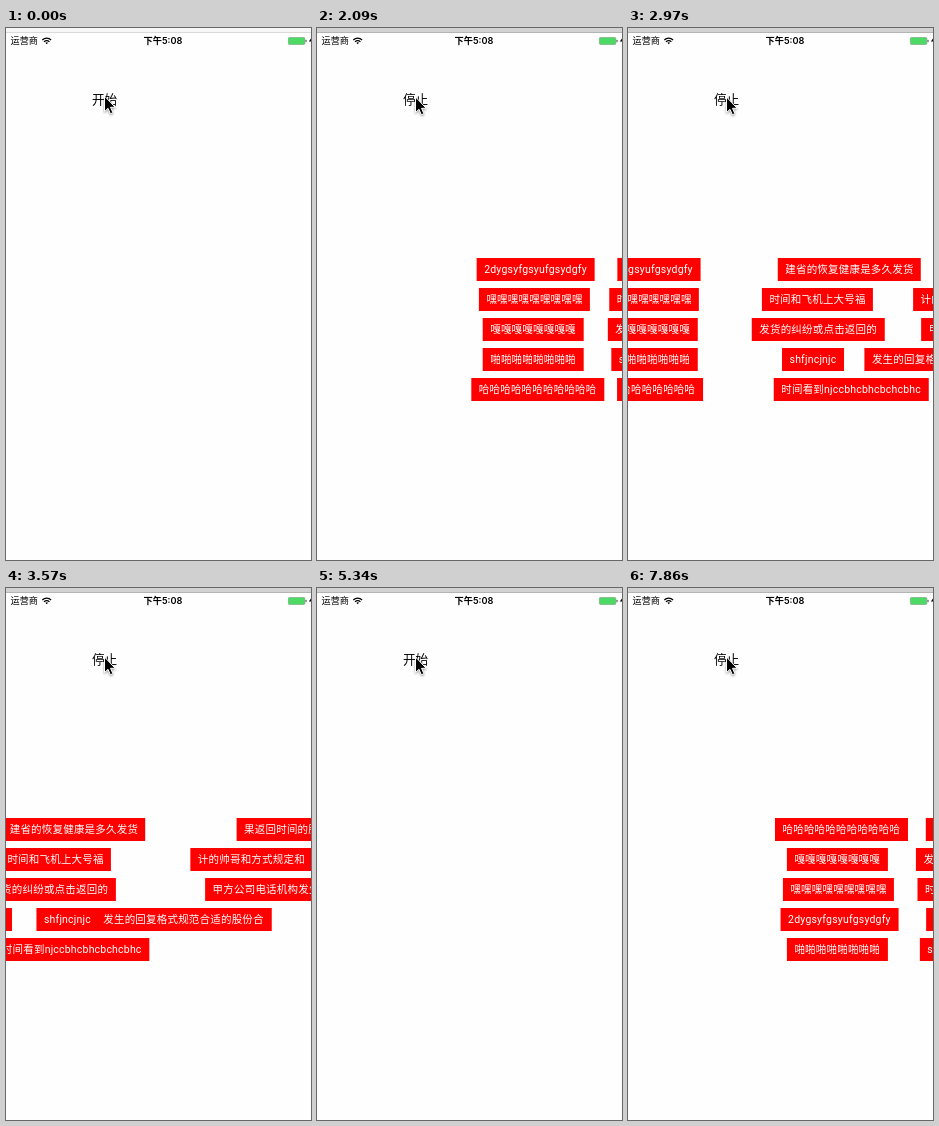
Animation, 305 px wide and 532 px high, one loop 8000 ms. Source, as an HTML page:

```html
<!DOCTYPE html>
<html lang="zh-CN">
<head>
<meta charset="utf-8">
<style>
  html, body { margin: 0; width: 100%; height: 100%; overflow: hidden; background: #fefefe; }
  #stage { position: relative; width: 305px; height: 532px; overflow: hidden; }
  svg { position: absolute; left: 0; top: 0; }
  text { font-family: Inter, "Noto Sans CJK SC", "Noto Sans CJK", sans-serif; }
  .bullet {
    position: absolute; left: 0; height: 22.5px; padding: 0 7.5px;
    background: #f00; color: #fff; white-space: nowrap;
    font: 10.5px/23.4px Roboto, "Noto Sans CJK SC", "Noto Sans CJK", sans-serif;
    letter-spacing: .2px;
  }
</style>
</head>
<body>
<div id="stage">
  <svg width="305" height="532" viewBox="0 0 305 532">
    <rect id="strip" width="305" height="4"/>
    <rect id="edge" y="4" width="305" height="1"/>
    <text x="4.6" y="16.2" font-size="9.1">运营商</text>
    <g fill="none" stroke="#000" stroke-width="1.2">
      <path d="M36.3 12a6.2 6.2 0 0 1 8.8 0M38 13.8a3.8 3.8 0 0 1 5.4 0"/>
      <path d="M40.7 16.2l-1.3-1.4a1.9 1.9 0 0 1 2.6 0z" fill="#000" stroke="none"/>
    </g>
    <text x="157" y="16.2" font-size="9.2" font-weight="600" text-anchor="middle">下午5:08</text>
    <rect x="282.4" y="9.5" width="16.4" height="7" rx="1" fill="#4cd964" stroke="#6f8f74" stroke-width=".5"/>
    <rect x="299.5" y="11.7" width="1" height="2.6" rx=".5" fill="#555"/>
    <path d="M305 10.5l-2.2 3h2.2z"/>
    <text id="button" x="98.5" y="76.2" font-size="12.6" text-anchor="middle"></text>
    <path id="cursor" d="M98.5 68v15.6l3.5-3.3 2.4 5.5 2.5-1.1-2.4-5.4h4.7z" stroke="#fff" stroke-width="1"
          style="filter: drop-shadow(0 1px 1px #0006)"/>
  </svg>
</div>
<script>
const LOOP = 8000, STEP = 148;
const SCREEN = 312, CROSSING = 19.9; // px, ticks
const STOP = 36;

// Each track: alternating text and launch delay in ticks
const tracks = [
  ['2dygsyfgsyufgsydgfy', 0, '建省的恢复健康是多久发货', 5.98, '果返回时间的股份合计上多个环节', 12.6],
  ['嘿'.repeat(9), 0, '时间和飞机上大号福', 5.21, '计的帅哥和方式规定和', 10.76],
  ['嘎'.repeat(8), 0, '发货的纠纷或点击返回的', 5.18, '甲方公司电话机构发生的结', 11.38],
  ['啪'.repeat(8), 0, 'shfjncjnjc', 5.19, '发生的回复格式规范合适的股份合', 8.8],
  ['哈'.repeat(11), 0, '时间看到njccbhcbhcbchcbhc', 5.98]
];
const rounds = [
  { start: 5.76, end: STOP, order: [0, 1, 2, 3, 4] },
  { start: 44.56, end: Infinity, order: [4, 2, 1, 0, 3] }
];

const $ = id => document.getElementById(id);
const bullets = [];
for (const { start, end, order } of rounds) {
  order.forEach((track, row) => {
    const items = tracks[track];
    for (let i = 0; i < items.length; i += 2) {
      const el = document.createElement('div');
      el.className = 'bullet';
      el.textContent = items[i];
      el.style.top = 230 + row * 30 + 'px';
      $('stage').append(el);
      bullets.push({ el, start: start + items[i + 1], end });
    }
  });
}

// cubic-bezier(.42, 0, .58, 1), solved by bisection
function easeInOut(x) {
  let lo = 0, hi = 1;
  for (let i = 0; i < 24; i++) {
    const s = (lo + hi) / 2, r = 1 - s;
    if (1.26 * s * r * r + 1.74 * s * s * r + s ** 3 < x) lo = s; else hi = s;
  }
  return lo * lo * (3 - 2 * lo);
}

function draw(now) {
  const tick = Math.min(53, Math.floor(now % LOOP / STEP));
  const focused = tick >= 5;
  $('strip').setAttribute('fill', focused ? '#d2d2d2' : '#f6f6f6');
  $('edge').setAttribute('fill', focused ? '#b4b4b4' : '#dadada');
  $('button').textContent = tick >= 6 && tick < STOP || tick >= 45 ? '停止' : '开始';
  $('cursor').setAttribute('transform', `translate(0 ${tick < 1 ? 0 : 1})`);

  for (const { el, start, end } of bullets) {
    const u = (tick - start) / CROSSING;
    const shown = u > 0 && u < 1 && tick < end;
    el.style.visibility = shown ? 'visible' : 'hidden';
    if (!shown) continue;
    const p = easeInOut(u);
    el.style.transform = `translateX(calc(${SCREEN * (1 - p)}px - ${100 * p}%))`;
  }
}

const origin = performance.now();
function frame() {
  draw(performance.now() - origin);
  requestAnimationFrame(frame);
}
frame();
</script>
</body>
</html>
```
